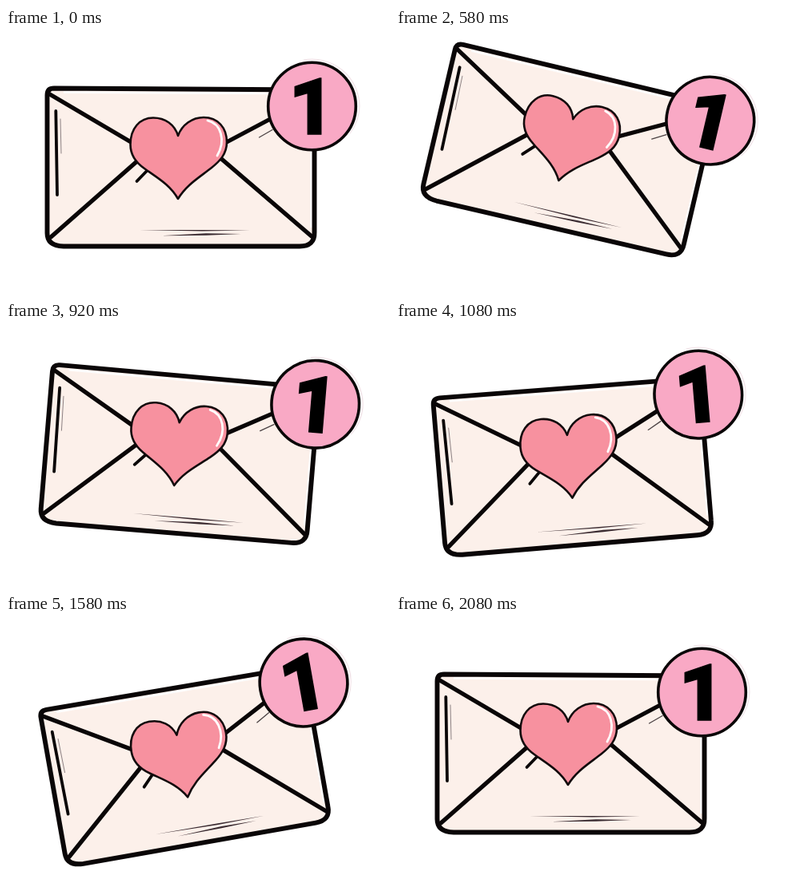
These frames come from a looping animation (480x332 px, 2.16 s). An HTML page:

```html
<!DOCTYPE html>
<html lang="en">
<head>
<meta charset="utf-8">
<title>New message</title>
<style>
  html, body { margin: 0; width: 100%; height: 100%; overflow: hidden; background: #fff; }
  svg { display: block; width: 100%; height: 100%; }
  .ink { fill: none; stroke: #0a0607; stroke-linecap: round; stroke-linejoin: round; }
  .count { font: 900 99px Roboto, Inter, sans-serif; text-anchor: middle; stroke: #000; stroke-width: 1.6; }
</style>
</head>
<body>
<svg viewBox="0 0 480 332">
  <defs>
    <path id="outline" d="M60 75.5 Q200 76.500 385.500 77.500 V256 Q386 273.500 367 273.500 H72 Q51.500 273 51.500 257 V84 Q51.500 75.500 60 75.500Z"/>
  </defs>
  <g id="letter">
    <use href="#outline" fill="#fcf0ea"/>
    <path fill="none" stroke="#fff" stroke-width="2.5" d="M72 80.500 L331 82 M381.500 152 V250"/>
    <use href="#outline" class="ink" stroke-width="5.900"/>
    <path class="ink" stroke-width="5.300" d="M53 82 L158 144 M272 145 L336 111 M56 262 L166 165 M267 162 L382 261"/>

    <!-- pen accents -->
    <path class="ink" stroke-width="3.800" d="M62.300 104 L64 209 M177 178 L163.500 192"/>
    <path class="ink" stroke-width="1" style="stroke:#8d8284" d="M68 114 L69 157"/>
    <path class="ink" stroke-width="1.300" style="stroke:#4b4244" d="M316.500 137 L333 127.500"/>
    <path fill="#3a2b31" d="M167 253 L245 253 L305 253.500 L245 254.600Z M194 260.200 L250 257.300 L294 258 L250 259.700Z"/>

    <path fill="#f7919f" stroke="#120a0c" stroke-width="2.600" stroke-linejoin="round"
      d="M215 214 C205 196 188 187 173 176 C160 167 155.500 157 155.500 146 C155.500 126 167 112.500 184 112.500
         C199 112.500 211 121 215 135 C220 121 233 112 247 112 C265 112 276 125 276 143
         C276 158 267 167 257 175 C242 187 226 196 215 214Z"/>
    <path fill="none" stroke="#fff" stroke-width="2.800" stroke-linecap="round" d="M252 116 C269 120 275 141 264 160"/>

    <path fill="none" stroke="#f3e4e9" stroke-width="1.200" d="M372 40 A59.500 59.500 0 0 1 442 98 A59.500 59.500 0 0 1 430 132"/>
    <circle cx="382.500" cy="98" r="54.800" fill="#f9a9c5" stroke="#0a0607" stroke-width="3.600"/>
    <text class="count" x="382" y="133">1</text>
  </g>
</svg>
<script>
  const LOOP = 2160, FPS = 12, SWING = 15, PIVOT = "309 152";
  const letter = document.getElementById("letter");

  const mix = (a, b, p) => a + (b - a) * p;
  const softEase = p => mix(p, (1 - Math.cos(Math.PI * p)) / 2, 0.5);

  // Steady tilt right, quick swing left, steady return.
  function tilt(step) {
    if (step < 8) return SWING * step / 8;
    if (step < 16) return mix(SWING, -SWING, softEase((step - 8) / 8));
    return mix(-SWING, 0, (step - 16) / 9);
  }

  function draw(ms) {
    // Steps start on whole hundredths of a second, so allow for the rounding.
    const step = Math.floor((ms % LOOP + 4) * FPS / 1000);
    letter.setAttribute("transform", `rotate(${tilt(step)} ${PIVOT})`);
  }

  let start;
  function tick(now) {
    start ??= now;
    draw(now - start);
    requestAnimationFrame(tick);
  }
  draw(0);
  requestAnimationFrame(tick);
</script>
</body>
</html>
```
